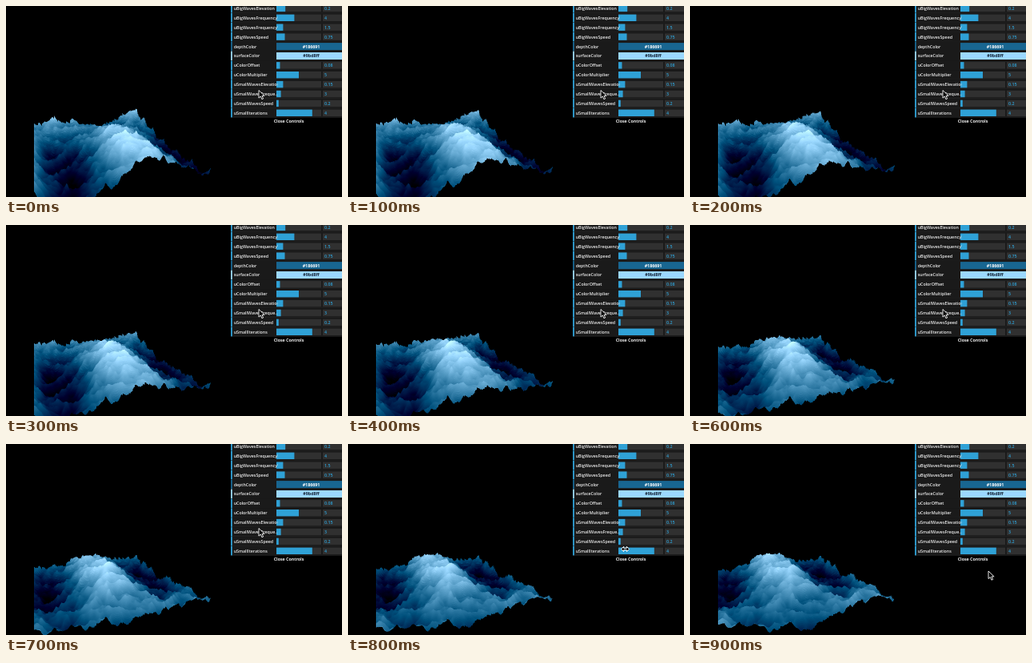
These frames come from a looping animation (420 by 239 pixels, 1000 ms). An HTML page with a canvas:

```html
<!DOCTYPE html>
<html lang="en">
<head>
<meta charset="utf-8">
<title>Sea surface with controls</title>
<style>
  html, body { margin: 0; width: 100%; height: 100%; overflow: hidden; background: #000; }
  canvas, svg { position: absolute; left: 0; top: 0; width: 100%; height: 100%; display: block; }
  text { font: 600 5.3px "Open Sans", "Noto Sans", sans-serif; fill: #eee; }
  .value { fill: #2fa1d6; }
  .bold { font-weight: 700; text-anchor: middle; }
</style>
</head>
<body>
<canvas id="sea" width="840" height="478"></canvas>
<svg viewBox="0 0 420 239" preserveAspectRatio="none">
  <clipPath id="labels"><rect x="281" y="0" width="58.5" height="140"/></clipPath>
  <g id="panel"></g>
  <path id="arrow" d="M0 0V9.6L2.3 7.5L3.9 11.2L5.6 10.5L4 6.9H7.1Z"
    fill="#000" stroke="#fff" stroke-width=".9" stroke-linejoin="round"/>
  <path id="resize" d="M-5 0L-1.8 -3.2V-1.1H1.8V-3.2L5 0L1.8 3.2V1.1H-1.8V3.2Z"
    fill="#000" stroke="#fff" stroke-width="1" stroke-linejoin="round"/>
</svg>
<script>
const LOOP = 1000, STEP = 100;
const W = 420, H = 239;
const $ = id => document.getElementById(id);
const mix = (a, b, k) => a + (b - a) * k;

// ---------- settings shown in the panel ----------
const sea = {
  elevation: .2, freqX: 4, freqZ: 1.5,
  offset: .08, multiplier: 5,
  smallElevation: .15, smallFreq: 3, smallSpeed: .2, iterations: 4
};

// label, value, slider maximum; colour rows have no maximum
const rows = [
  ['uBigWavesElevation', sea.elevation, 1],
  ['uBigWavesFrequencyX', sea.freqX, 10],
  ['uBigWavesFrequencyY', sea.freqZ, 10],
  ['uBigWavesSpeed', .75, 4],
  ['depthColor', '#186691'],
  ['surfaceColor', '#9bd8ff'],
  ['uColorOffset', sea.offset, 1],
  ['uColorMultiplier', sea.multiplier, 10],
  ['uSmallWavesElevation', sea.smallElevation, 1],
  ['uSmallWavesFreque...', sea.smallFreq, 30],
  ['uSmallWavesSpeed', sea.smallSpeed, 4],
  ['uSmallIterations', sea.iterations, 5]
];

const ROW = 11.9, LEFT = 281, SLIDER = 338, SLIDER_W = 56, VALUE = 396;

function rect(x, y, w, h, fill) {
  return `<rect x="${x}" y="${y}" width="${w}" height="${h}" fill="${fill}"/>`;
}

function rowMarkup([label, value, max], i) {
  const mid = 3 + i * ROW, top = mid - ROW / 2, base = mid + 1.9;
  let out = rect(LEFT, top, W - LEFT, ROW, '#1a1a1a')
    + rect(LEFT, top + ROW - .45, W - LEFT, .45, '#2c2c2c')
    + rect(LEFT, top, 1.8, ROW - .4, max ? '#2fa1d6' : value);
  if (max) {
    out += rect(SLIDER, mid - 4.3, SLIDER_W, 8.4, '#303030')
      + rect(SLIDER, mid - 4.3, SLIDER_W * value / max, 8.4, '#2fa1d6')
      + rect(VALUE, mid - 4.3, W - VALUE, 8.4, '#303030')
      + `<text class="value" x="398" y="${base}">${value}</text>`;
  } else {
    const ink = label === 'depthColor' ? '#fff' : '#123';
    out += rect(SLIDER, mid - 4.5, W - SLIDER, 9, value)
      + `<text class="bold" x="381.5" y="${base}" style="fill:${ink}">${value}</text>`;
  }
  return out + `<text x="284.7" y="${base}" clip-path="url(#labels)">${label}</text>`;
}

$('panel').innerHTML = rows.map(rowMarkup).join('')
  + rect(LEFT, 139.8, W - LEFT, 8.6, '#000')
  + '<text class="bold" x="353.5" y="145.8">Close Controls</text>';

// ---------- gradient noise ----------
let seed = 7;
const random = () => (seed = seed * 16807 % 2147483647) / 2147483647;
const perm = Array.from({ length: 256 }, (_, i) => i);
for (let i = 255; i > 0; i--) {
  const j = Math.floor(random() * (i + 1));
  [perm[i], perm[j]] = [perm[j], perm[i]];
}
const hash = (x, y, z) => perm[(perm[(perm[x & 255] + y) & 255] + z) & 255];
const fade = t => t * t * t * (t * (t * 6 - 15) + 10);

function slope(h, x, y, z) {
  h &= 15;
  const u = h < 8 ? x : y;
  const v = h < 4 ? y : h === 12 || h === 14 ? x : z;
  return (h & 1 ? -u : u) + (h & 2 ? -v : v);
}

function noise(x, y, z) {
  const X = Math.floor(x), Y = Math.floor(y), Z = Math.floor(z);
  x -= X; y -= Y; z -= Z;
  const u = fade(x), v = fade(y), w = fade(z);
  const at = (i, j, k) => slope(hash(X + i, Y + j, Z + k), x - i, y - j, z - k);
  const edge = (j, k) => mix(at(0, j, k), at(1, j, k), u);
  return mix(mix(edge(0, 0), edge(1, 0), v), mix(edge(0, 1), edge(1, 1), v), w);
}

// ---------- sea ----------
const PHASE = .88, PHASE_RATE = 1.3;   // big wave phase, radians per second
const NOISE_GAIN = 1.25;

function elevation(x, z, t) {
  const phase = PHASE + PHASE_RATE * t;
  let e = Math.sin(x * sea.freqX + phase) * Math.sin(z * sea.freqZ + phase) * sea.elevation;
  const drift = t * PHASE_RATE / .75 * sea.smallSpeed;
  for (let i = 1; i <= sea.iterations; i++) {
    const f = sea.smallFreq * i;
    e -= Math.abs(noise(x * f, z * f, drift)) * NOISE_GAIN * sea.smallElevation / i;
  }
  return e;
}

// Perspective of the 2 x 2 plane: q is the distance below the horizon,
// and 1 / q grows evenly along both sides of the plane.
const HORIZON = 62, EDGE = 35;
const NEAR_Q = 169, LEFT_Q = 85, RIGHT_Q = 125;   // near, far left and right corners
const alongX = (1 / RIGHT_Q - 1 / NEAR_Q) / 2;
const alongZ = (1 / LEFT_Q - 1 / NEAR_Q) / 2;
const SPREAD = .888, LIFT = .837;

const SCALE = 2, Q_STEP = .5;
const ctx = $('sea').getContext('2d');
const image = ctx.createImageData(W * SCALE, H * SCALE);
const deep = [24, 102, 145], surface = [155, 216, 255];

function paintColumn(col, t) {
  const x = (col + .5) / SCALE;
  let low = -1;
  // near to far: each sample shows only above the nearer ones
  for (let q = NEAR_Q; q > 70; q -= Q_STEP) {
    const a = (x - EDGE) / (SPREAD * q);
    const b = (1 / q - 1 / NEAR_Q - alongX * a) / alongZ;
    if (b < 0) continue;
    if (a > 2 || b > 2) break;

    const e = elevation(a - 1, 1 - b, t);
    const y = Math.round((HORIZON + q - q * LIFT * e) * SCALE);
    if (low < 0) low = Math.min(y, H * SCALE);
    if (y >= low) continue;

    const light = (e + sea.offset) * sea.multiplier;
    for (let c = 0; c < 3; c++) {
      const tone = mix(deep[c], surface[c], light);
      for (let row = y; row < low; row++) image.data[(row * W * SCALE + col) * 4 + c] = tone;
    }
    for (let row = y; row < low; row++) image.data[(row * W * SCALE + col) * 4 + 3] = 255;
    low = y;
  }
}

function drawSea(t) {
  image.data.fill(0);
  for (let col = EDGE * SCALE; col < 262 * SCALE; col++) paintColumn(col, t);
  ctx.putImageData(image, 0, 0);
}

// ---------- pointer ----------
function place(id, visible, x, y) {
  $(id).setAttribute('visibility', visible ? 'visible' : 'hidden');
  $(id).setAttribute('transform', `translate(${x} ${y})`);
}

function drawPointer(ms) {
  const resizing = ms >= 800 && ms < 900;
  const [x, y] = ms < 800 ? [316, 105.5] : [373, 159];
  place('arrow', !resizing, x, y);
  place('resize', resizing, 346.5, 131.5);
}

// ---------- loop ----------
let shown = -1;
const start = performance.now();

function tick() {
  const ms = Math.floor((performance.now() - start) % LOOP / STEP) * STEP;
  if (ms !== shown) {
    shown = ms;
    drawSea(ms / 1000);
    drawPointer(ms);
  }
  requestAnimationFrame(tick);
}
tick();
</script>
</body>
</html>
```
